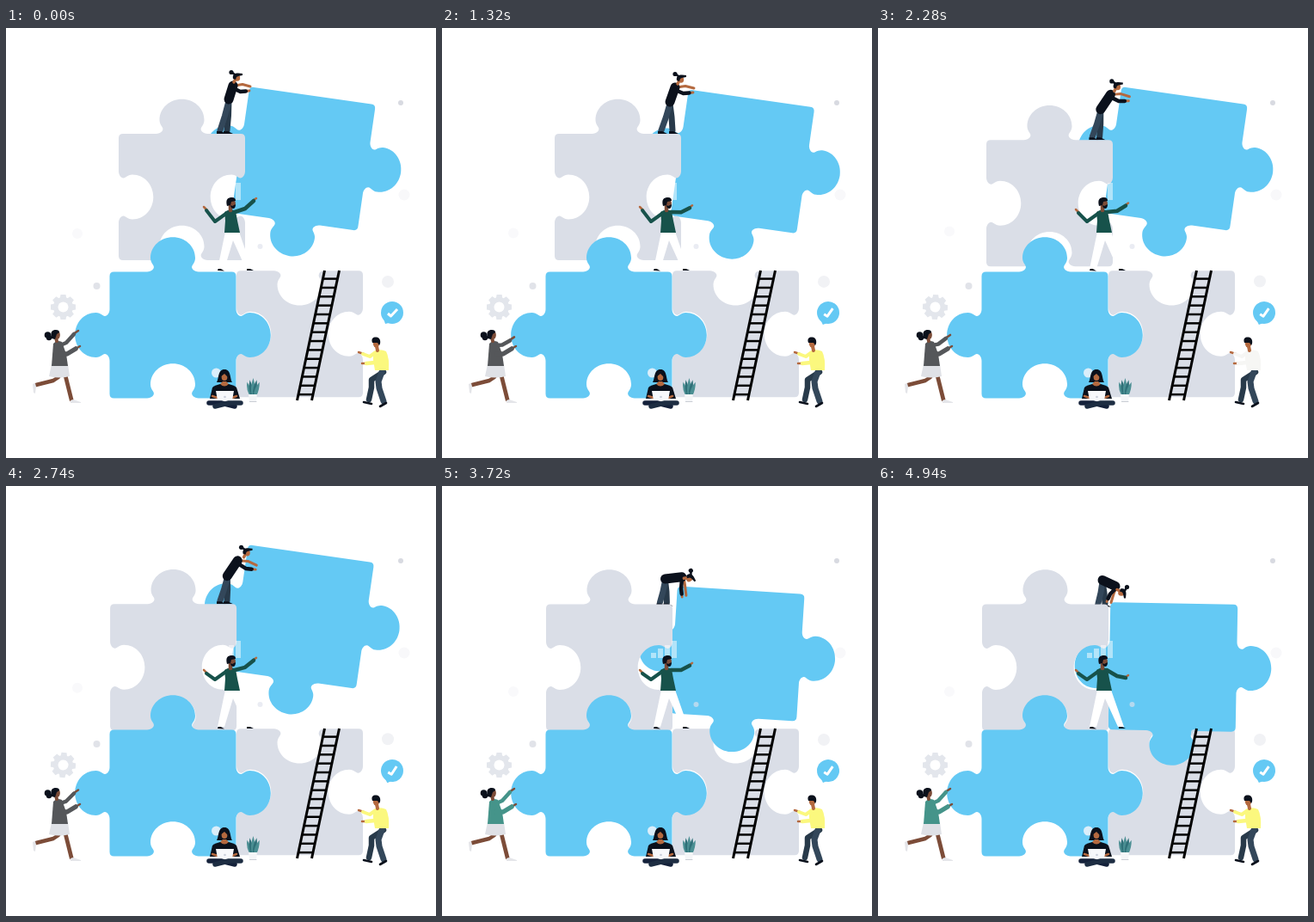
Write an HTML page with a canvas that moves like this. It is 500 px wide and 500 px high and loops after 4960 ms.

```html
<!DOCTYPE html>
<html lang="en">
<head>
<meta charset="utf-8">
<title>Puzzle team</title>
<style>
  html, body { margin: 0; width: 100%; height: 100%; overflow: hidden; background: #fff; }
  canvas { display: block; width: 500px; height: 500px; }
</style>
</head>
<body>
<canvas id="stage"></canvas>
<script>
const LOOP = 4960;
const BLUE = '#64c9f4', GREY = '#dadee7', INK = '#0b111c', NAVY = '#14213a',
      SLATE = '#33475a', DUSK = '#283a4a', TAN = '#b4693f', BROWN = '#7c4c38',
      TEAL = '#45948a', GREEN = '#17524b';

const canvas = document.getElementById('stage');
const ctx = canvas.getContext('2d');
const ratio = window.devicePixelRatio || 1;
canvas.width = canvas.height = 500 * ratio;

// timing: part of the way from a to b, eased there, or there and back
const part = (t, a, b) => Math.min(1, Math.max(0, (t - a) / (b - a)));
const ease = (t, a, b) => { const u = part(t, a, b); return u * u * (3 - 2 * u); };
const bump = (t, a, b) => Math.sin(Math.PI * part(t, a, b)) ** 2;

// drawing helpers
function fill(shape, color) {
  ctx.fillStyle = color;
  ctx.fill(typeof shape === 'string' ? new Path2D(shape) : shape);
}
function disc(x, y, r, color, ry = r) {
  ctx.fillStyle = color;
  ctx.beginPath();
  ctx.ellipse(x, y, r, ry, 0, 0, 7);
  ctx.fill();
}
function limb(points, width, color, cap = 'round') {
  ctx.strokeStyle = color;
  ctx.lineWidth = width;
  ctx.lineCap = cap;
  ctx.lineJoin = 'round';
  ctx.beginPath();
  points.forEach(p => ctx.lineTo(p[0], p[1]));
  ctx.stroke();
}
function at(x, y, degrees, draw) {
  ctx.save();
  ctx.translate(x, y);
  ctx.rotate(degrees * Math.PI / 180);
  draw();
  ctx.restore();
}

// Jigsaw piece centred on 0,0; sides run top, right, bottom, left: 1 knob, -1 hole, 0 flat
function piece(sides, size = 147, r = 5, depth = 40.3) {
  const h = size / 2, path = new Path2D();
  sides.forEach((kind, k) => {
    const turn = (x, y) => [[x, y], [-y, x], [-x, -y], [y, -x]][k];
    const p = (x, y) => turn(x, -h - y * kind);
    if (k === 0) path.moveTo(-h + r, -h);
    if (kind) {
      path.lineTo(...p(-30, 0));
      path.bezierCurveTo(...p(-25, 0), ...p(-20, 4), ...p(-23, 8));
      path.bezierCurveTo(...p(-25, 11), ...p(-26, 13), ...p(-26, 16));
      path.bezierCurveTo(...p(-26, 30), ...p(-14, depth), ...p(0, depth));
      path.bezierCurveTo(...p(14, depth), ...p(26, 30), ...p(26, 16));
      path.bezierCurveTo(...p(26, 13), ...p(25, 11), ...p(23, 8));
      path.bezierCurveTo(...p(20, 4), ...p(25, 0), ...p(30, 0));
    }
    path.lineTo(...turn(h - r, -h));
    path.quadraticCurveTo(...turn(h, -h), ...turn(h, -h + r));
  });
  path.closePath();
  return path;
}
const upperGrey = piece([1, -1, -1, -1]);
const lowerGrey = piece([-1, -1, 0, -1]);
const lowerBlue = piece([1, 1, -1, 1]);
const fallingBlue = piece([0, 1, 1, 1], 148);

// Stands on the grey piece, then bends over as the blue one tips down
function climber(t, floor, tip) {
  const step = ease(t, 0, 600), push = step - ease(t, 1600, 2400), crouch = ease(t, 1900, 3000);
  const swing = Math.sin(Math.PI * tip), angle = tip * Math.PI / 2;
  const hx = 268 + 9 * step + 3 * crouch + 4 * tip + 6 * swing;
  const hy = floor - 66 + 2 * step + 4 * crouch + 46 * tip;
  const sx = hx - 4 - 2 * step - 5 * crouch + 3 * tip, sy = hy + 10 - 17 * tip;
  const px = 259 + 6 * push - 2 * crouch + 4 * tip, py = floor - 40 + 3 * step + 5 * crouch + 4 * tip;
  const ax = hx + 16 - 5 * crouch - 24 * tip, ay = hy + 11 + 5 * crouch + 8 * swing - 4 * tip;
  const bx = ax - Math.cos(angle) - 5 * Math.sin(angle), by = ay - Math.sin(angle) + 5 * Math.cos(angle);
  const foot = floor - 2 + 3 * tip, rear = 248 + 6 * push + 7 * tip;

  for (const [x, tone] of [[rear + 8 + 5 * push, DUSK], [rear, SLATE]]) {
    limb([[px, py + 2], [(px + x) / 2 + 1, (py + foot) / 2], [x + 1, foot - 2]], 7, tone);
    fill(`M${x - 3} ${foot + 2}v-3h5l6 3z`, INK);
  }
  limb([[sx + 2, sy], [(sx + ax) / 2 + 1, (sy + ay) / 2 - 2], [ax, ay]], 3, TAN);
  limb([[sx, sy], [px, py]], 11, INK);
  const ex = (sx + bx) / 2 - 1, ey = (sy + by) / 2 + 4 * Math.cos(angle);
  limb([[ex, ey], [bx, by]], 2.8, TAN);
  limb([[sx, sy + 3], [ex, ey], [ex + (bx - ex) * .6, ey + (by - ey) * .6]], 4.5, INK);
  at(hx, hy, 90 * tip, () => {
    limb([[-1, 2], [-3, 6]], 3.5, TAN);
    disc(1, 1, 3.2, TAN, 3.8);
    fill('M-4 2C-5-3-2-4.500 2-4.500L7-4V-2L2-1 0 0-1 3Z', INK);
    disc(-6, -5.5, 2.6, INK);
    limb([[-5, -5], [-2, -3]], 2.5, INK);
  });
}

function guide(right, left) {
  fill('M246 282q0-3 3-2.500l5 3z', INK);
  fill('M280 282v-2.500q5 0 8 2.500z', INK);
  fill('M255 237H271L286 280H279L264 247 254 280H246Z', '#fff');
  limb([[291, right], [287, right + 3]], 2.5, TAN);
  limb([[230, left], [234, left + 4]], 2.5, TAN);
  limb([[257, 215], [243, 225], [233, left + 4]], 4, GREEN);
  limb([[266, 214], [278, (214 + right) / 2 + 4], [288, right + 3]], 4.5, GREEN);
  fill('M254 214Q261 209 267 213L269 224 272 238H254L255 224Z', GREEN);
  limb([[261, 206], [261, 212]], 4.5, BROWN);
  disc(263, 204, 4, BROWN, 4.5);
  fill('M257 207C255 199 258 197 263 197Q267 197 267 201L262 202 261 206Z', INK);
  fill('M261 206L263 207 267 205Q267 210 264 210 261 209 261 206Z', INK);
}

function runner(hand, sweater) {
  limb([[61, 406], [55, 410], [35, 415]], 4.5, BROWN);
  fill('M31 414l3-1 1 4-1 8-2-1z', '#e4e5e9');
  limb([[69, 404], [72, 416], [76, 432]], 4.8, BROWN);
  fill('M75 433l3-1 9 3v1H75z', '#e4e5e9');
  fill('M53 391H72L74 405Q62 408 50 405Z', '#dfe1e6');
  limb([[84, hand], [78, hand + 4]], 2.5, BROWN);
  limb([[63, 369], [70, 366 + (hand - 352) / 3], [79, hand + 4]], 4.5, sweater);
  fill('M55 367Q59 362 65 365L70 379 72 393H53Z', sweater);
  limb([[86, 370], [81, 373]], 2.5, BROWN);
  limb([[63, 379], [71, 379], [81, 373]], 5.5, sweater);
  limb([[58, 360], [59, 364]], 4, BROWN);
  disc(59.5, 357, 3.4, BROWN, 4.8);
  fill('M53 361C51 353 54 351 58 351Q62 351 62 354L59 356 57 362Z', INK);
  disc(48.5, 357, 3.8, INK);
  disc(50, 360, 3.2, INK);
}

function helper(shirt) {
  limb([[439, 400], [425, 409], [425, 418], [422, 432]], 6.5, DUSK);
  limb([[437, 400], [433, 411], [434, 419], [439, 434]], 7, SLATE);
  limb([[416, 435], [425, 437]], 2.6, INK);
  limb([[435, 440], [442, 436]], 2.6, INK);
  limb([[410, 377], [416, 379]], 2.5, TAN);
  limb([[414, 390], [420, 390]], 2.5, TAN);
  limb([[430, 377], [423, 382], [415, 379]], 4, shirt);
  fill('M427 377Q434 372 442 376 446 384 445 398H429L427 386Z', shirt);
  limb([[436, 383], [429, 389], [419, 390]], 4.5, shirt);
  limb([[431, 370], [432, 375]], 4, TAN);
  disc(430.5, 367, 3.6, TAN, 4.6);
  fill('M426 366C424 360 428 359 431 359.500 436 360 436 367 434 369L432 366Z', INK);
}

function sitter() {
  fill('M245 412C248 407 246 397 254 397S260 407 263 412Z', INK);
  fill('M240 418Q243 415 254 413 265 415 268 418L272 431H237Z', INK);
  fill('M249 414Q254 419 259 414L256 411H252Z', TAN);
  disc(254, 405.5, 3.4, TAN, 4.6);
  fill('M249 406Q249 399 254 399 259 400 259 407L254 402Z', INK);
  limb([[240, 428], [246, 430]], 2.5, TAN);
  limb([[268, 428], [263, 430]], 2.5, TAN);
  limb([[236, 436], [250, 436], [266, 440]], 5.5, NAVY);
  limb([[273, 436], [259, 436], [243, 440]], 5.5, '#1d2d42');
  fill('M244 422H265L263 433H246Z', '#f7f8fb');
  disc(254.5, 429, 1.3, '#c9ced9');
}

function plant() {
  for (let i = -2; i <= 2; i++) {
    at(287.5 + i, 428, i * 9, () => {
      const tall = 21 - 2 * Math.abs(i);
      fill(`M-1.500 0Q-4 ${-tall / 2} 0 ${-tall}Q3 ${-tall / 2} 1.500 0Z`, i % 2 ? '#2f7078' : '#4b8f93');
    });
  }
  fill('M282 426H292L291 435H283Z', '#f5f6f8');
  limb([[283, 434.5], [291, 434.5]], 1, '#c9cdd4');
}

function ladder() {
  for (let y = 291.6; y < 430; y += 10.35) {
    const x = 370.5 - (y - 282) * .212;
    limb([[x, y], [x + 17, y]], 2.5, '#000', 'butt');
  }
  for (const x of [370.5, 387.5]) limb([[x, 282], [x - 32, 433]], 3, '#000', 'butt');
}

function gear(angle) {
  at(66.5, 324.5, angle, () => {
    for (let i = 0; i < 8; i++) at(0, 0, i * 45, () => fill('M-4-9L-3-14.500H3L4-9Z', '#e3e6ec'));
    disc(0, 0, 11.5, '#e3e6ec');
    disc(0, 0, 6, '#fff');
  });
}

function badge(angle) {
  at(449, 331, angle, () => {
    disc(0, 0, 13, BLUE);
    fill('M-10 7L-8 13 0 11Z', BLUE);
    limb([[-5, 1], [-1.5, 4], [6, -4]], 3, '#fff', 'butt');
  });
}

function render(t) {
  const sway = bump(t, 0, 1760), slide = ease(t, 1760, 2800), fall = ease(t, 2880, 4150);
  const tip = fall ** 1.5, reach = bump(t, 0, 3200);
  const swell = (1 - Math.cos(8 * Math.PI * t / LOOP)) / 2;
  const gx = 131 - 10 * slide, gy = 123 + 14.5 * slide;

  ctx.setTransform(ratio, 0, 0, ratio, 0, 0);
  ctx.fillStyle = '#fff';
  ctx.fillRect(0, 0, 500, 500);

  disc(459, 87, 3, '#d8dae1');
  disc(463, 194, 6.5, '#f8f8fa');
  disc(83, 239 - 11 * swell, 6, '#f9f9fb');
  disc(105.5, 300, 4, '#e1e3e9');
  disc(444, 295 - 2 * swell, 7, '#f1f2f5');

  at(341.5, 355.8, 0, () => fill(lowerGrey, GREY));
  const bx = 346 + 7 * sway - 3 * ease(t, 2300, 3100), by = 152 + 6.5 * sway + 58.5 * fall;
  at(bx, by, 8.2 - 7.2 * tip, () => fill(fallingBlue, BLUE));
  climber(t, gy, tip);
  at(gx + 73.5, gy + 73.5, 0, () => fill(upperGrey, GREY));
  at(194, 357, 0, () => fill(lowerBlue, BLUE));

  ctx.fillStyle = 'rgba(255,255,255,.5)';
  [6, 11, 15, 20].forEach((h, i) => ctx.fillRect(243 + i * 8, 200 - h, 6, h));
  disc(295.5, 254, 3, 'rgba(223,226,236,.65)');
  disc(368, 287, 4, 'rgba(217,221,231,.8)');
  disc(244.5, 401, 5.5, 'rgba(240,244,250,.85)');

  gear(11 * swell);
  badge(-8 * ease(t, 0, 400) - 16 * bump(t, 2600, 3800));
  ladder();
  guide(198 + 9 * reach + 22 * ease(t, 3200, 4500), 208 + 6 * slide);
  runner(352 + 8 * reach, t < 3460 ? '#55575a' : TEAL);
  helper(t >= 2040 && t < 2520 ? '#f6f6f4' : '#fbf87e');
  sitter();
  plant();
}

const start = performance.now();
function tick() {
  render((performance.now() - start) % LOOP);
  requestAnimationFrame(tick);
}
tick();
</script>
</body>
</html>
```
